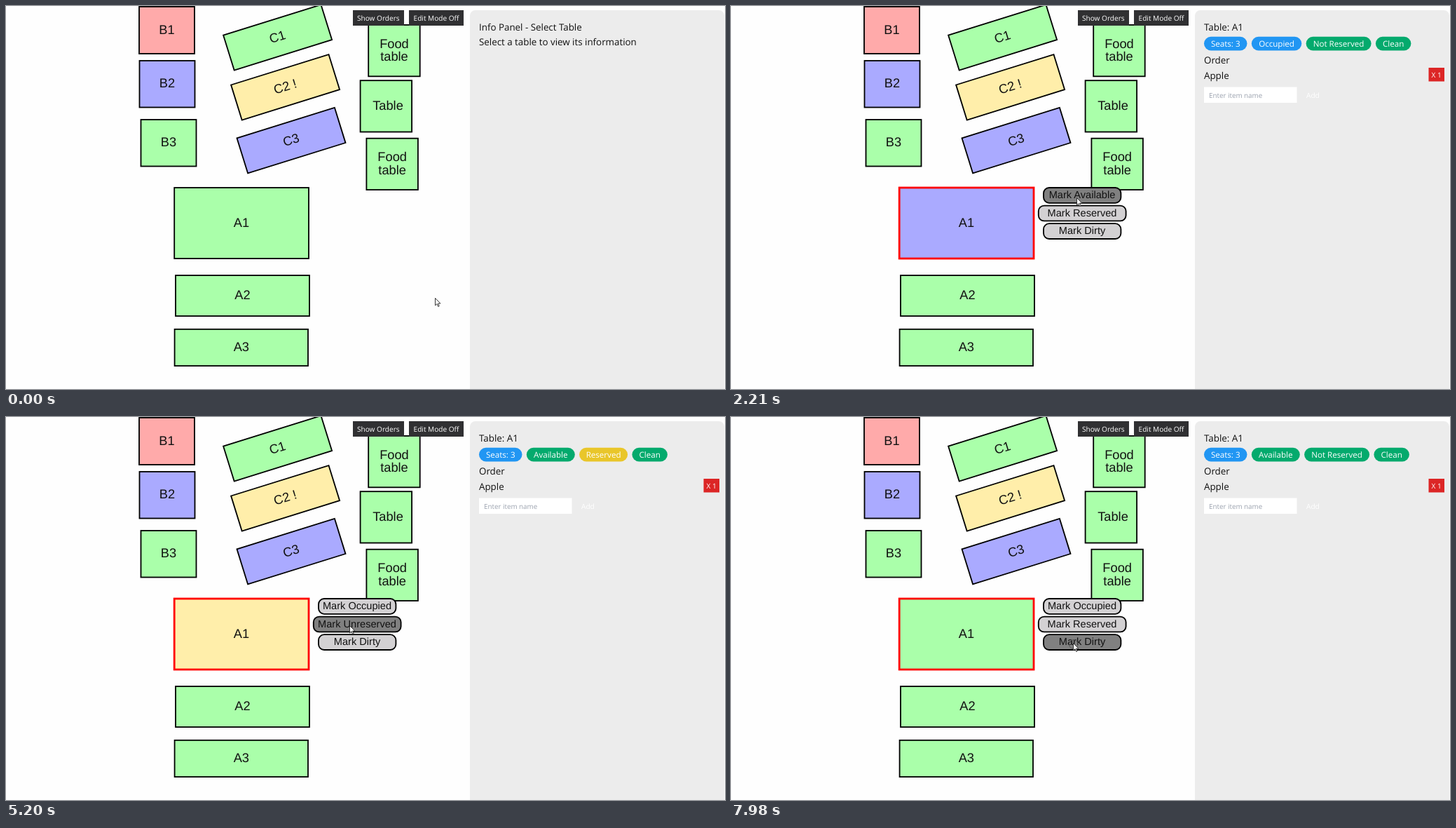
An HTML page that plays this animation: 1026x546 px, repeating every 8 s.

```html
<!DOCTYPE html>
<html lang="en">
<head>
<meta charset="utf-8">
<title>Table plan</title>
<style>
html, body { margin: 0; width: 100%; height: 100%; overflow: hidden; background: #fefefe; }
svg { display: block; text-rendering: geometricPrecision; }
text { font-family: "Open Sans", "Noto Sans", sans-serif; fill: #111; }
.plan text { font: 18.25px "Liberation Sans", Arial, sans-serif; text-anchor: middle; }
.plan rect { stroke: #000; stroke-width: 1.83; }
.plan .menu { font-size: 14.6px; }
.plan .selected { stroke: #f00; stroke-width: 2.8; }
.body { font-size: 13.35px; }
.pill { font-size: 11.6px; }
.small { font-size: 10.1px; }
.hint { font-size: 9.8px; fill: #9ca3af; }
.white { fill: #fff; }
.mid { text-anchor: middle; }
</style>
</head>
<body>
<svg id="stage" width="1026" height="546" viewBox="0 0 1026 546"></svg>
<script>
const LOOP = 8000;
const GREEN = '#afa', RED = '#faa', BLUE = '#aaf', YELLOW = '#fea';
const PILL_BLUE = '#2196f3', PILL_GREEN = '#04aa6d', PILL_YELLOW = '#e9c62a';

// [time, x, y] of the pointer tip
const MOVES = [
  [0, 612, 416], [150, 549, 393], [270, 491, 368], [430, 404, 324], [580, 373, 318],
  [1410, 404, 311], [1530, 462, 291], [1660, 483, 281], [1810, 490, 275], [1930, 493, 273],
  [2360, 492, 273], [2480, 492, 272], [2790, 492, 271], [4070, 487, 283], [4220, 486, 293],
  [4380, 485, 294], [4520, 488, 296], [4640, 490, 297], [7250, 489, 304], [7410, 487, 323],
  [7550, 488, 322]
];
// [time, hovered menu row]
const HOVERS = [[0, -1], [1530, 1], [1660, -1], [1810, 0], [4220, 1], [7410, 2]];
// [time, state of table A1]
const STATES = [[0, 'idle'], [980, 'free'], [2210, 'occupied'], [3350, 'free'], [5200, 'reserved'], [6440, 'free']];
const CLICKS = [[860, 980], [6320, 6440], [7980, 8000]];

const PILL_WIDTH = { 'Seats: 3': 61.5, Available: 69, Occupied: 71.5, 'Not Reserved': 93, Reserved: 69, Clean: 50.5 };

const at = (keys, t) => keys.filter(k => k[0] <= t).pop();

const rect = (x, y, w, h, fill, r = 0, cls = '') =>
  `<rect x="${x}" y="${y}" width="${w}" height="${h}" rx="${r}" fill="${fill}" class="${cls}"/>`;

const text = (x, y, s, cls = '') => `<text x="${x}" y="${y}" class="${cls}">${s}</text>`;

function table(x, y, w, h, fill, label, labelX = x + w / 2, cls = '') {
  const lines = label.split('/');
  const base = y + h / 2 + 5.2 - (lines.length - 1) * 9.1;
  return rect(x, y, w, h, fill, 0, cls) +
    lines.map((s, i) => text(labelX, base + i * 18.2, s)).join('');
}

const tilted = (x, y, fill, label) =>
  `<g transform="translate(${x} ${y}) rotate(-17.3)">${table(-73, -26.2, 146, 52.4, fill, label)}</g>`;

const plan =
  table(190, 1, 79, 67, RED, 'B1') +
  table(190.5, 78, 79, 66.5, BLUE, 'B2') +
  table(192.5, 162, 79, 66.5, GREEN, 'B3') +
  tilted(387.6, 44.9, GREEN, 'C1') +
  tilted(398.6, 115.8, YELLOW, 'C2 !') +
  tilted(407, 191.7, BLUE, 'C3') +
  table(517.2, 27, 73.5, 73.3, GREEN, 'Food/table') +
  table(505.6, 106.2, 73.5, 73.3, GREEN, 'Table', 545) +
  table(514.4, 188.7, 73.5, 73.3, GREEN, 'Food/table') +
  table(242, 384, 191, 58, GREEN, 'A2') +
  table(240.6, 460.8, 190.4, 52.2, GREEN, 'A3');

const toolbar =
  rect(495, 6, 73, 22, '#303032') + text(531.3, 20.8, 'Show Orders', 'small white mid') +
  rect(575, 6, 78, 22, '#303032') + text(614, 20.8, 'Edit Mode Off', 'small white mid');

const panelBox = rect(662, 6, 363, 560, '#ececec', 8);

function menu(state, hover) {
  const labels = [
    state === 'occupied' ? 'Mark Available' : 'Mark Occupied',
    state === 'reserved' ? 'Mark Unreserved' : 'Mark Reserved',
    'Mark Dirty'
  ];
  return labels.map((s, i) => {
    const w = i === 1 ? 124.8 : 110.4, y = 259 + i * 25.6;
    return rect(501.2 - w / 2, y, w, 21.8, i === hover ? '#808080' : '#d3d1d3', 8) +
      text(501, y + 15, s, 'menu');
  }).join('');
}

function pills(state) {
  let x = 675;
  return [
    ['Seats: 3', PILL_BLUE],
    state === 'occupied' ? ['Occupied', PILL_BLUE] : ['Available', PILL_GREEN],
    state === 'reserved' ? ['Reserved', PILL_YELLOW] : ['Not Reserved', PILL_GREEN],
    ['Clean', PILL_GREEN]
  ].map(([label, color]) => {
    const w = PILL_WIDTH[label];
    const pill = rect(x, 43.8, w, 19.6, color, 9.8) + text(x + w / 2, 58, label, 'pill white mid');
    x += w + 6.3;
    return pill;
  }).join('');
}

function panel(state) {
  if (state === 'idle') {
    return text(675, 35, 'Info Panel - Select Table', 'body') +
      text(675, 56, 'Select a table to view its information', 'body');
  }
  return text(675, 35, 'Table: A1', 'body') + pills(state) +
    text(675, 82.4, 'Order', 'body') + text(675, 103.8, 'Apple', 'body') +
    rect(995.5, 88, 22.5, 19.5, '#dc2626') + text(1006.7, 101.6, 'X 1', 'small white mid') +
    rect(675, 115.5, 132.5, 22.5, '#fff') + text(682, 130.6, 'Enter item name', 'hint') +
    text(821, 130.6, 'Add', 'small white');
}

function pointer(x, y, clicking) {
  const ring = clicking
    ? `<circle cx="${x + .8}" cy="${y + 2}" r="6.3" fill="none" stroke="#555"/>` : '';
  return ring + `<path transform="translate(${x + .5} ${y + .5})" fill="#fff" stroke="#222" stroke-width=".9"
    d="M0 0V10.4L2.4 8.2L4.2 12L5.7 11.3L4 7.6H7.4Z"/>`;
}

function scene(t) {
  const state = at(STATES, t)[1], [, x, y] = at(MOVES, t);
  const active = state !== 'idle';
  const fill = { occupied: BLUE, reserved: YELLOW }[state] || GREEN;
  return '<g class="plan">' + plan +
    table(240.2, 259, 191.8, 101, fill, 'A1', 336, active ? 'selected' : '') +
    (active ? menu(state, at(HOVERS, t)[1]) : '') + '</g>' +
    toolbar + panelBox + panel(state) +
    pointer(x, y, CLICKS.some(([from, to]) => t >= from && t < to));
}

const stage = document.getElementById('stage');
const start = performance.now();
let shown = '';

function draw() {
  const next = scene((performance.now() - start) % LOOP);
  if (next !== shown) stage.innerHTML = shown = next;
  requestAnimationFrame(draw);
}
draw();
</script>
</body>
</html>
```
